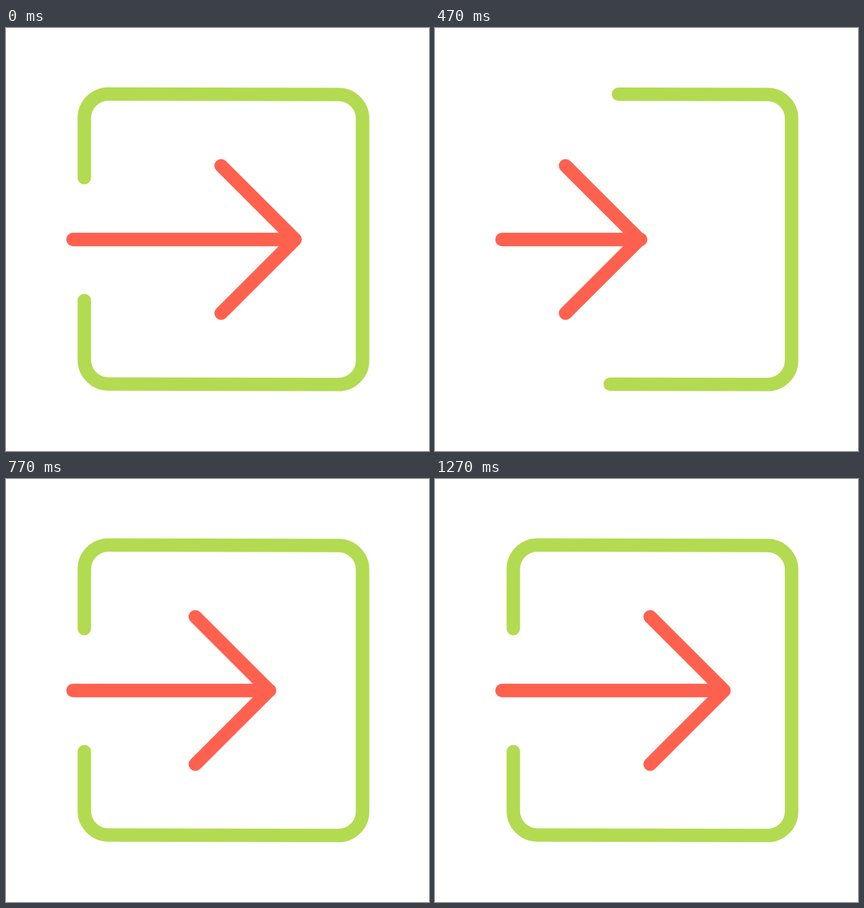
Animation, 640 px wide and 640 px high, one loop 2000 ms. Source, as an HTML page with a canvas:

```html
<!DOCTYPE html>
<html lang="en">
<head>
<meta charset="utf-8">
<title>Enter arrow</title>
<style>
  html, body { margin: 0; width: 100%; height: 100%; overflow: hidden; background: #fff; }
  canvas { display: block; width: 640px; height: 640px; }
</style>
</head>
<body>
<canvas id="stage" width="640" height="640"></canvas>
<script>
const ctx = document.getElementById('stage').getContext('2d');
const LOOP = 2000;
const FPS = 30;
const GREEN = '#b2db51';
const RED = '#ff614f';
const FRAME_LENGTH = 1471;
const TIP = 437.3;
const MID = 320;

// Smooth 0..1 progress between two ticks; bend skews it early or late.
function ease(tick, from, to, bend = 1) {
  const p = Math.min(1, Math.max(0, (tick - from) / (to - from))) ** bend;
  return p * p * (3 - 2 * p);
}

// Rise to 1 at the peak, then fall back to 0.
function pulse(tick, from, peak, to, bendUp, bendDown) {
  return tick < peak
    ? ease(tick, from, peak, bendUp)
    : 1 - ease(tick, peak, to, bendDown);
}

function drawFrame(retract) {
  const start = 0.22 * retract * FRAME_LENGTH;
  const end = (1 - 0.21 * retract) * FRAME_LENGTH;
  const r = 36.5;
  ctx.strokeStyle = GREEN;
  if (retract > 0) {
    ctx.setLineDash([end - start, 2 * FRAME_LENGTH]);
    ctx.lineDashOffset = -start;
  }
  ctx.beginPath();
  ctx.moveTo(118.5, 226.4);
  ctx.arcTo(118.5, 99.8, 539.5, 100.7, r);
  ctx.arcTo(539.5, 100.7, 539.5, 539.5, r);
  ctx.arcTo(539.5, 539.5, 118.5, 538.5, r);
  ctx.arcTo(118.5, 538.5, 118.5, 412.5, r);
  ctx.lineTo(118.5, 412.5);
  ctx.stroke();
  ctx.setLineDash([]);
}

function drawArrow(shift) {
  const tip = TIP - shift;
  ctx.strokeStyle = RED;
  ctx.beginPath();
  ctx.moveTo(101.4, MID);
  ctx.lineTo(TIP - 0.985 * shift, MID);
  ctx.moveTo(tip - 111.8, MID - 111.6);
  ctx.lineTo(tip, MID);
  ctx.lineTo(tip - 111.8, MID + 111.6);
  ctx.stroke();
}

function render(time) {
  const tick = Math.floor((time % LOOP + 3.4) * FPS / 1000);
  ctx.fillStyle = '#fff';
  ctx.fillRect(0, 0, 640, 640);
  ctx.lineWidth = 20.4;
  ctx.lineCap = ctx.lineJoin = 'round';

  drawFrame(pulse(tick, 0, 11, 22.6));
  drawArrow(tick < 30
    ? 138.5 * pulse(tick, 0, 11.3, 30, 1.05, 0.92)
    : 71 * pulse(tick, 30, 34, 38));
}

const began = performance.now();
function loop() {
  render(performance.now() - began);
  requestAnimationFrame(loop);
}
loop();
</script>
</body>
</html>
```
